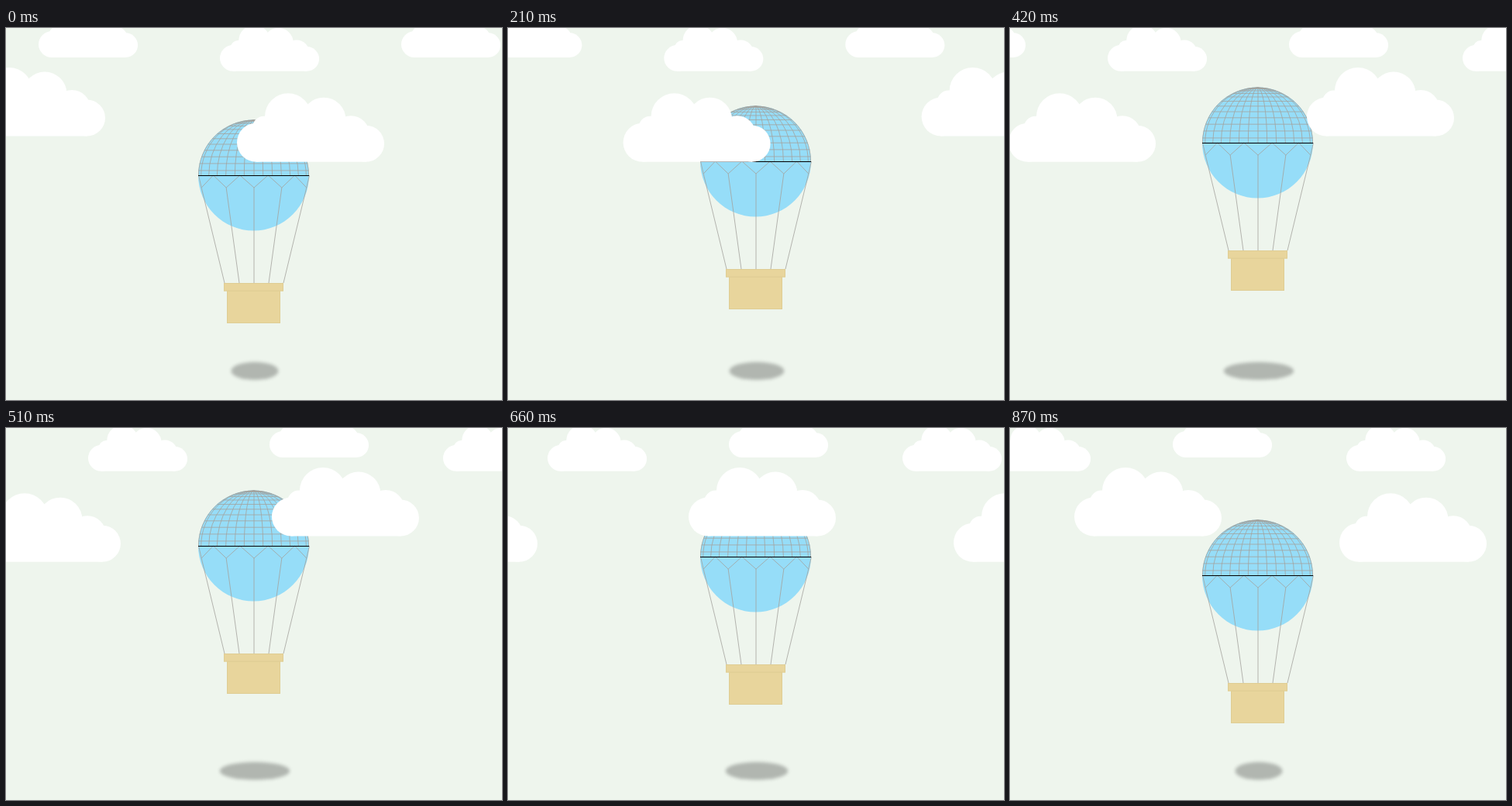
These frames come from a looping animation (640 px wide and 480 px high, 0.9 s). An HTML page with a canvas:

```html
<!DOCTYPE html>
<html lang="en">
<head>
<meta charset="utf-8">
<title>Hot-air balloon</title>
<style>
  html, body { margin: 0; width: 640px; height: 480px; overflow: hidden; background: #eef5ed; }
  canvas { display: block; }
</style>
</head>
<body>
<canvas id="stage" width="640" height="480"></canvas>
<script>
const ctx = document.getElementById('stage').getContext('2d');
const LOOP = 900, HOLD = 60, R = 71.5, THREAD = '#a4a29d';

// Time (ms) and progress of the flight; the pace is slightly uneven.
const PACE = [[0, 0], [210, .249], [420, .5], [570, .667], [660, .75], [810, .898], [870, 1]];

// Circles of a cloud (x, y, radius), measured from its bottom left corner.
const PUFFS = [
  [25, -25, 25], [35, -44, 15], [66, -58.5, 30],
  [112, -54.5, 28.5], [147, -35.5, 24], [166.5, -23.5, 23.5]
];

// Each stretch of the pace moves in held steps.
function progressAt(time) {
  const i = PACE.findLastIndex(([start]) => start <= time);
  const [start, from] = PACE[i];
  if (i === PACE.length - 1) return from;
  const [end, to] = PACE[i + 1];
  const held = Math.floor((time - start) / HOLD) * HOLD;
  return from + (to - from) * held / (end - start);
}

// Height of the balloon above its lowest point: up, then down, easing in.
function liftAt(progress) {
  const ease = x => x * (.72 + .28 * x);
  return 42 * (progress < .5 ? ease(2 * progress) : 1 - ease(2 * progress - 1));
}

// Distance of a seam from the axis; seams crowd towards the rim.
const seam = k => 36.5 * k - .65 * k ** 3;

function circle(x, y, r) {
  ctx.beginPath();
  ctx.arc(x, y, r, 0, 2 * Math.PI);
  ctx.fill();
}

function cloud(x, bottom, scale) {
  ctx.save();
  ctx.translate(x, bottom);
  ctx.scale(scale, scale);
  ctx.fillStyle = '#fff';
  ctx.fillRect(25, -47, 141.5, 47);
  PUFFS.forEach(puff => circle(...puff));
  ctx.restore();
}

function line(x1, y1, x2, y2, color = THREAD) {
  ctx.beginPath();
  ctx.moveTo(x1, y1);
  ctx.lineTo(x2, y2);
  ctx.strokeStyle = color;
  ctx.stroke();
}

function box(x, y, w, h) {
  ctx.fillStyle = '#e8d59c';
  ctx.strokeStyle = '#dfcd94';
  ctx.fillRect(x, y, w, h);
  ctx.strokeRect(x + .5, y + .5, w - 1, h - 1);
}

function net() {
  ctx.lineWidth = .8;
  for (let k = 1; k <= 11; k++) {
    const angle = (7.3 * k - 2) * Math.PI / 180;
    const half = R * Math.cos(angle), y = .5 - R * Math.sin(angle);
    line(-half, y, half, y);
  }
  for (let k = 1; k <= 7; k++) {
    ctx.beginPath();
    ctx.ellipse(0, 0, k < 7 ? seam(k / 3) : R - .5, R - .5, 0, Math.PI, 2 * Math.PI);
    ctx.stroke();
  }
  line(.5, -R, .5, 0);
}

function ropes() {
  for (let k = -2; k <= 2; k++) {
    const x = seam(k);
    line(x, 16, 19 * k, 139);
    if (k > -2) line(seam(k - .5), 0, x, 16);
    if (k < 2) line(x, 16, seam(k + .5), 0);
  }
  for (const side of [-1, 1]) line(seam(2) * side, 16, R * side, 0);
}

function balloon(y) {
  ctx.save();
  ctx.translate(319.5, Math.round(y));
  ctx.fillStyle = '#96ddf8';
  circle(0, 0, R);
  net();
  ctx.translate(.5, 0);
  ropes();
  ctx.lineWidth = 1;
  line(-72, .5, 71, .5, '#000');
  box(-35, 149, 69, 42);
  box(-39, 139, 77, 10.5);
  ctx.restore();
}

// The shadow widens in steps as the balloon rises.
function shadow(lift) {
  ctx.save();
  ctx.filter = 'blur(2.2px)';
  ctx.fillStyle = 'rgba(0, 0, 0, .255)';
  ctx.beginPath();
  ctx.ellipse(321, 442.5, 30.5 + 4.9 * Math.round(lift / 14), 11.5, 0, 0, 2 * Math.PI);
  ctx.fill();
  ctx.restore();
}

function draw(time) {
  const progress = progressAt(time), lift = liftAt(progress);
  const far = 300 * progress, near = 600 * progress;
  ctx.fillStyle = '#eef5ed';
  ctx.fillRect(0, 0, 640, 480);
  shadow(lift);
  balloon(190 - lift);
  for (const x of [42, 510]) cloud(x - far, 38, .674);
  for (const x of [276, 734]) cloud(x - far, 55.7, .674);
  for (const x of [-62, 683]) cloud(x - near, 139.5, 1);
  for (const x of [298, 1025]) cloud(x - near, 172.7, 1);
}

function tick() {
  draw(performance.now() % LOOP);
  requestAnimationFrame(tick);
}
tick();
</script>
</body>
</html>
```
